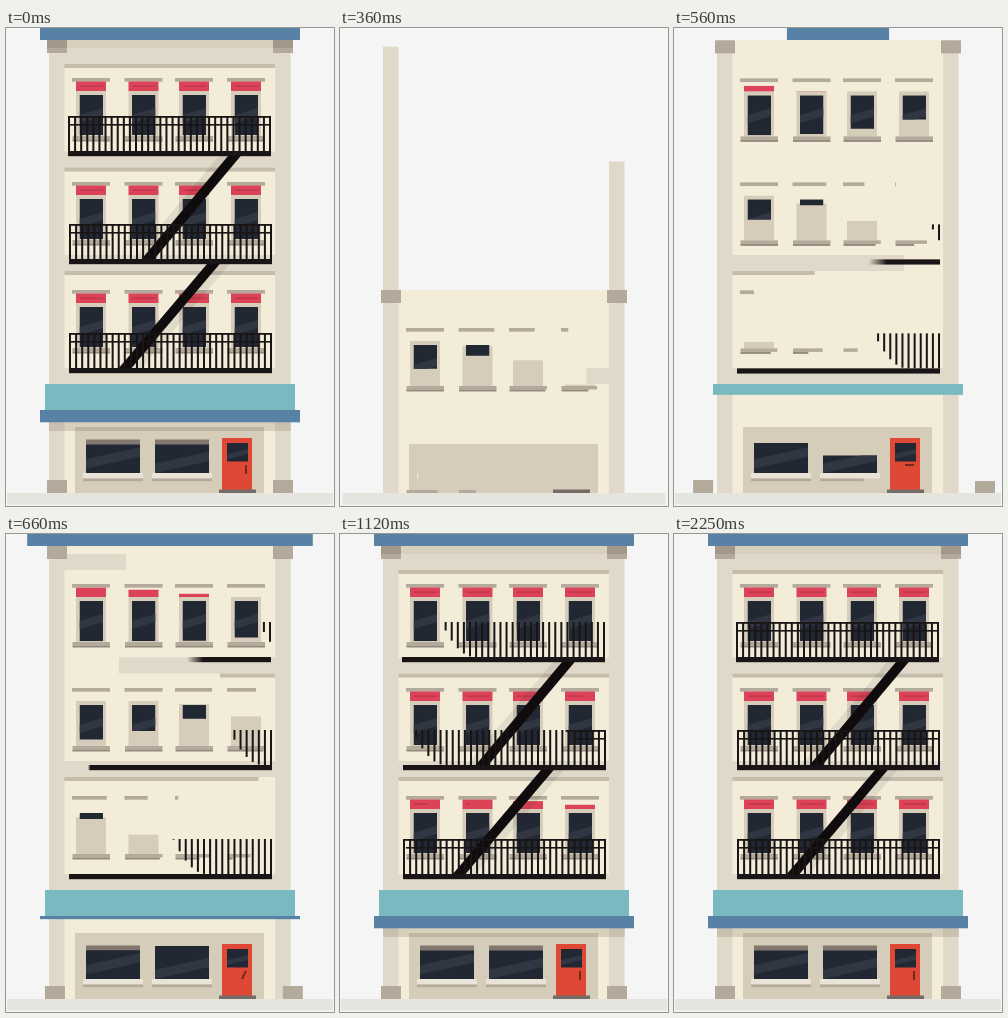
These frames come from a looping animation (328x478 px, 2270 ms). An HTML page with a canvas:

```html
<!DOCTYPE html>
<html lang="en">
<head>
<meta charset="utf-8">
<title>Building assembly</title>
<style>
  html, body { margin: 0; width: 100%; height: 100%; overflow: hidden; background: #f5f5f5; }
  canvas { display: block; width: 328px; height: 478px; }
</style>
</head>
<body>
<canvas id="stage"></canvas>
<script>
const WIDTH = 328, HEIGHT = 478, LOOP = 2270, GROUND = 465;
const C = {
  sky: '#f5f5f5', ground: '#e6e4de', wall: '#f2ecd9', column: '#e0d9c9', stone: '#b4aa9c',
  stoneDark: '#93897c', bandShade: '#c5bcac', frame: '#d6ccba', glass: '#222833', shine: '#303642',
  red: '#dc4358', redLine: '#b93349', iron: '#191415', blue: '#5782a5', teal: '#7bb9c0',
  door: '#e04836', sill: '#eae4d8', step: '#746c66', shade: 'rgba(70,50,30,.15)'
};
const WINDOW_X = [66, 118.5, 169, 221];
const STAGGER = 66;
const BAR_GAPS = 33;
// Start times of each part, per floor
const FLOORS = [
  { y: 0, sill: 8, lintel: 143, frame: 160, awning: 492 },
  { y: 104, sill: 243, lintel: 361, frame: 380, awning: 682 },
  { y: 212, sill: 387, lintel: 520, frame: 546, awning: 872 }
];
const BALCONIES = [
  { x: 62, y: 88, floor: 614, bars: 627, rails: 1215 },
  { x: 63, y: 196, floor: 522, bars: 535, rails: 1100 },
  { x: 63, y: 305, floor: 351, bars: 364, rails: 940 }
];
const BANDS = [
  { y: 20, start: 629, fromRight: false },
  { y: 123.5, start: 563, fromRight: true },
  { y: 227, start: 447, fromRight: false },
  { y: 340, start: 350, fromRight: true }
];

const canvas = document.getElementById('stage');
const ctx = canvas.getContext('2d');
const ratio = window.devicePixelRatio || 1;
canvas.width = WIDTH * ratio;
canvas.height = HEIGHT * ratio;

let time = 0;

const unit = (start, duration) => Math.min(1, Math.max(0, (time - start) / duration));
const ease = (start, duration = 200) => 1 - (1 - unit(start, duration)) ** 2;
const easeBack = (start, duration) => {
  const v = unit(start, duration) - 1;
  return 1 + 2.70158 * v ** 3 + 1.70158 * v ** 2;
};

function rect(x, y, w, h, color) {
  if (w <= 0 || h <= 0) return;
  ctx.fillStyle = color;
  ctx.fillRect(x, y, w, h);
}
const growRight = (x, y, w, h, p, color) => rect(x, y, w * p, h, color);
const growLeft = (x, y, w, h, p, color) => rect(x + w * (1 - p), y, w * p, h, color);
const growDown = (x, y, w, h, p, color) => rect(x, y, w, h * p, color);
const growUp = (x, y, w, h, p, color) => rect(x, y + h * (1 - p), w, h * p, color);

function poly(points, color) {
  ctx.fillStyle = color;
  ctx.beginPath();
  points.forEach(([x, y]) => ctx.lineTo(x, y));
  ctx.fill();
}

function clipped(x, y, w, h, paint) {
  if (w <= 0 || h <= 0) return;
  ctx.save();
  ctx.beginPath();
  ctx.rect(x, y, w, h);
  ctx.clip();
  paint();
  ctx.restore();
}

// A pane with one slanted reflection; level and thickness are shares of its height
function glass(x, y, w, h, slope, level, thickness) {
  rect(x, y, w, h, C.glass);
  const low = y + h * level, thick = h * thickness;
  poly([[x, low], [x + w, low - slope], [x + w, low - slope + thick], [x, low + thick]], C.shine);
}

function drawWindow(floor, column) {
  const x = WINDOW_X[column], y = floor.y, delay = column * STAGGER;
  const glassHeight = 40 * ease(floor.frame + 92 + delay, 300);
  growRight(x, y + 50, 38, 3.7, ease(floor.lintel + delay), C.stone);
  growUp(x + 4, y + 63, 30, 45, ease(floor.frame + delay), C.frame);
  clipped(x + 7.5, y + 67, 23.5, glassHeight, () => glass(x + 7.5, y + 67, 23.5, 40, 7, .5, .2));
  growRight(x + .5, y + 108, 37.5, 3.5, ease(floor.sill + delay), C.stone);
  growRight(x + .5, y + 111.5, 37.5, 2, ease(floor.sill + 62 + delay), C.stoneDark);
  const awning = floor.awning + delay;
  growUp(x + 4, y + 53.5, 30, 9.5, ease(awning), C.red);
  growRight(x + 8, y + 57.5, 23, 1.2, ease(awning + 170), C.redLine);
}

function drawBands() {
  BANDS.forEach(({ y, start, fromRight }) => {
    const grow = fromRight ? growLeft : growRight;
    grow(58, y, 211, 16, ease(start), C.column);
    grow(58, y + 16, 211, 4, ease(start + 70), C.bandShade);
  });
}

function drawBalcony({ x, y, floor, bars, rails }) {
  const p = ease(floor), left = x + 203 * (1 - p), fade = 28 * (1 - p);
  if (p > 0) {
    const ink = ctx.createLinearGradient(left, 0, left + fade + .01, 0);
    ink.addColorStop(0, fade ? 'rgba(25,20,21,0)' : C.iron);
    ink.addColorStop(1, C.iron);
    rect(left, y + 35, 203 * p, 5.2, ink);
  }
  for (let i = 0; i <= BAR_GAPS; i++) {
    growDown(x + 201 * (1 - i / BAR_GAPS), y, 2, 35, ease(bars + i * 18.5, 100), C.iron);
  }
  growLeft(x, y, 203, 1.8, ease(rails), C.iron);
  growLeft(x, y + 8, 203, 1.6, ease(rails + 5), C.iron);
}

function drawStair(topX, topY, bottomX, bottomY, shadowShift, start) {
  const slab = (shift, color) => poly([
    [topX + shift, topY], [topX + 12.7 + shift, topY],
    [bottomX + 12.7 + shift, bottomY], [bottomX + shift, bottomY]
  ], color);
  const h = (bottomY - topY) * ease(start, 180);
  clipped(0, bottomY - h, WIDTH, h, () => {
    slab(shadowShift, 'rgba(50,40,30,.09)');
    slab(0, '#100b0c');
  });
}

function drawShop() {
  growUp(69, 399, 189, 66, ease(262), C.frame);
  const displays = [
    { x: 77, sill: 360, pane: 470, blind: 585, level: .58 },
    { x: 146, sill: 465, pane: 520, blind: 664, level: .72 }
  ];
  displays.forEach(({ x, sill, pane, blind, level }) => {
    const h = 33 * ease(pane, 130);
    clipped(x + 3, 445 - h, 54, h, () => glass(x + 3, 412, 54, 33, 12, level, .28));
    growDown(x + 3, 411.5, 54, 5, ease(blind, 100), '#81776f');
    growRight(x, 445, 60, 5.5, ease(sill, 100), C.sill);
    growRight(x, 450.5, 60, 2.7, ease(sill + 48, 100), C.stone);
  });
  const rise = 55 * (1 - ease(364, 150));
  ctx.save();
  ctx.translate(0, rise);
  rect(216, 410, 30, 53, C.door);
  rect(221, 415, 21, 18.5, C.glass);
  poly([[221, 426], [242, 421], [242, 426], [221, 431]], C.shine);
  ctx.translate(240, 437);
  ctx.rotate((1 - ease(570)) * Math.PI / 2);
  rect(-1, 0, 2, 9, '#74291f');
  ctx.restore();
  growUp(213, 461.5, 37, 3.5, ease(250, 100), C.step);
}

function drawColumns(wallTop) {
  growUp(43, 12, 15.5, 453, ease(115, 280), C.column);
  growUp(269, 12, 15.5, 453, ease(226, 280), C.column);
  rect(41, wallTop, 20, 13, C.stone);
  rect(267, wallTop, 20, 13, C.stone);
  const leftFoot = 14 + 27 * ease(545, 160);
  const rightFoot = 301 - 34 * ease(587, 160);
  growUp(leftFoot, 452, 20, 13, ease(385, 170), C.stone);
  growUp(rightFoot, 452, 20, 13, ease(440, 170), C.stone);
}

function drawCornices() {
  growDown(41, 12, 246, 8, ease(760, 150), C.shade);
  growDown(43, 394, 242, 9, ease(760, 150), C.shade);
  growDown(39, 356, 250, 26, ease(535, 110), C.teal);
  growDown(34, 382, 260, 12.3, ease(643, 130), C.blue);
  const half = 130 * easeBack(540, 220);
  rect(164 - half, 0, half * 2, 12, C.blue);
}

function draw() {
  ctx.setTransform(ratio, 0, 0, ratio, 0, 0);
  rect(0, 0, WIDTH, HEIGHT, C.sky);
  const lift = 453 * (1 - ease(289, 280));
  const lifted = paint => {
    ctx.save();
    ctx.translate(0, lift);
    paint();
    ctx.restore();
  };

  clipped(0, 0, WIDTH, GROUND, () => {
    rect(58, 12 + lift, 212, 453, C.wall);
    drawBands();
    drawShop();
    lifted(() => FLOORS.forEach(floor => WINDOW_X.forEach((_, i) => drawWindow(floor, i))));
    drawColumns(12 + lift);
    drawCornices();
    lifted(() => {
      drawStair(201, 236, 112, 341, 10, 740);
      drawStair(222, 128, 134, 233, -9, 880);
      BALCONIES.forEach(drawBalcony);
    });
  });

  const half = 163 * ease(0, 400);
  rect(164 - half, GROUND, half * 2, 11.5, C.ground);
}

function tick(now) {
  const t = now % LOOP;
  time = t < 20 ? LOOP : t; // the loop opens on the finished building
  draw();
  requestAnimationFrame(tick);
}
time = LOOP;
draw();
requestAnimationFrame(tick);
</script>
</body>
</html>
```
